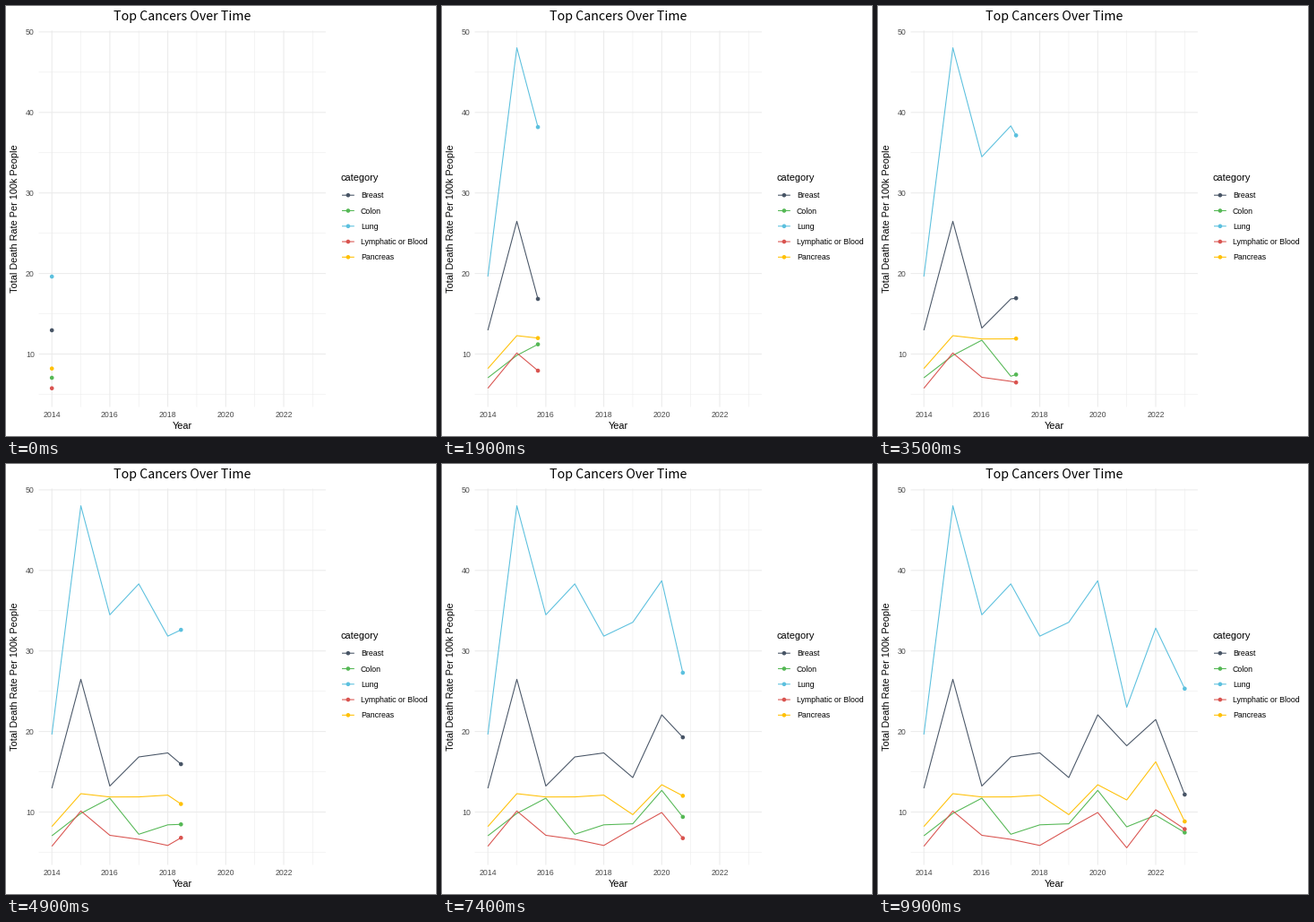
Animation of 480x480 px, one loop 10 s. Source, as a matplotlib script:

```python
import numpy as np
import matplotlib.pyplot as plt
from matplotlib.animation import FuncAnimation
from matplotlib.patches import Circle

SIZE, DPI = 480, 72          # at 72 dpi one point equals one pixel
FRAMES, INTERVAL = 100, 100
LEFT, RIGHT, TOP, BOTTOM = 36.6, 356.9, 27.4, 447.5
LINE, DOT = 1.07, 2.3
GRID, TICK = "#EBEBEB", "#4D4D4D"

YEARS = np.arange(2014, 2024)
SERIES = {
    "Breast": ("#485566", [12.95, 26.48, 13.23, 16.84, 17.34,
                           14.28, 22.07, 18.23, 21.49, 12.17]),
    "Colon": ("#55B855", [7.05, 9.83, 11.72, 7.24, 8.41,
                          8.54, 12.69, 8.16, 9.61, 7.46]),
    "Lung": ("#5BC0DE", [19.62, 48.03, 34.49, 38.33, 31.84,
                         33.56, 38.72, 23.01, 32.84, 25.32]),
    "Lymphatic or Blood": ("#D9534F", [5.75, 10.13, 7.11, 6.61, 5.85,
                                       7.94, 9.94, 5.56, 10.28, 7.88]),
    "Pancreas": ("#FFC107", [8.20, 12.28, 11.87, 11.88, 12.10,
                             9.68, 13.39, 11.50, 16.24, 8.83]),
}

plt.rcParams["font.family"] = "Liberation Sans"


def px(year):
    return 51.2 + 32.35 * (np.asarray(year) - 2014)


def py(rate):
    return 388.5 - 8.99 * (np.asarray(rate) - 10)


fig = plt.figure(figsize=(SIZE / DPI, SIZE / DPI), dpi=DPI, facecolor="white")
ax = fig.add_axes([0, 0, 1, 1])
ax.set(xlim=(0, SIZE), ylim=(SIZE, 0))
ax.axis("off")


def stroke(xs, ys, color, width=LINE, z=2):
    line, = ax.plot(xs, ys, color=color, lw=width, zorder=z, snap=False,
                    solid_capstyle="butt", solid_joinstyle="round")
    return line


def dot(x, y, color):
    return ax.add_patch(Circle((x, y), DOT, fc=color, lw=0, zorder=4))


def label(x, y, text, size=8.8, color="black", **kw):
    ax.text(x, y, text, size=size, color=color, va="baseline", **kw)


def draw_grid():
    for year in YEARS:
        major = year % 2 == 0
        stroke([px(year)] * 2, [TOP, BOTTOM], GRID, LINE if major else LINE / 2, 1)
        if major:
            label(px(year), 459, str(year), color=TICK, ha="center")
    for rate in range(5, 51, 5):
        major = rate % 10 == 0
        stroke([LEFT, RIGHT], [py(rate)] * 2, GRID, LINE if major else LINE / 2, 1)
        if major:
            label(31.8, py(rate) + 3.2, str(rate), color=TICK, ha="right")


def draw_legend():
    label(373, 195, "category", 11)
    for i, (name, (color, _)) in enumerate(SERIES.items()):
        y = 211.2 + 17.28 * i
        stroke([375, 388.8], [y, y], color)
        dot(381.9, y, color)
        label(395.8, y + 3.1, name)


draw_grid()
draw_legend()
label(197, 16, "Top Cancers Over Time", 14.2, ha="center", family="Noto Sans CJK JP")
label(196.8, 472, "Year", 11, ha="center")
label(13.2, 237.3, "Total Death Rate Per 100k People", 10.9, ha="center",
      rotation=90, rotation_mode="anchor")

trails = [(stroke([], [], color), dot(0, 0, color), np.array(rates))
          for color, rates in SERIES.values()]


def update(frame):
    now = 2014 + 9 * frame / (FRAMES - 1)
    past = YEARS < now
    for line, head, rates in trails:
        rate = np.interp(now, YEARS, rates)
        line.set_data(px(np.append(YEARS[past], now)),
                      py(np.append(rates[past], rate)))
        head.center = px(now), py(rate)
    return [artist for line, head, _ in trails for artist in (line, head)]


anim = FuncAnimation(fig, update, frames=FRAMES, interval=INTERVAL,
                     repeat=True, repeat_delay=0, blit=False)
plt.show()
```
